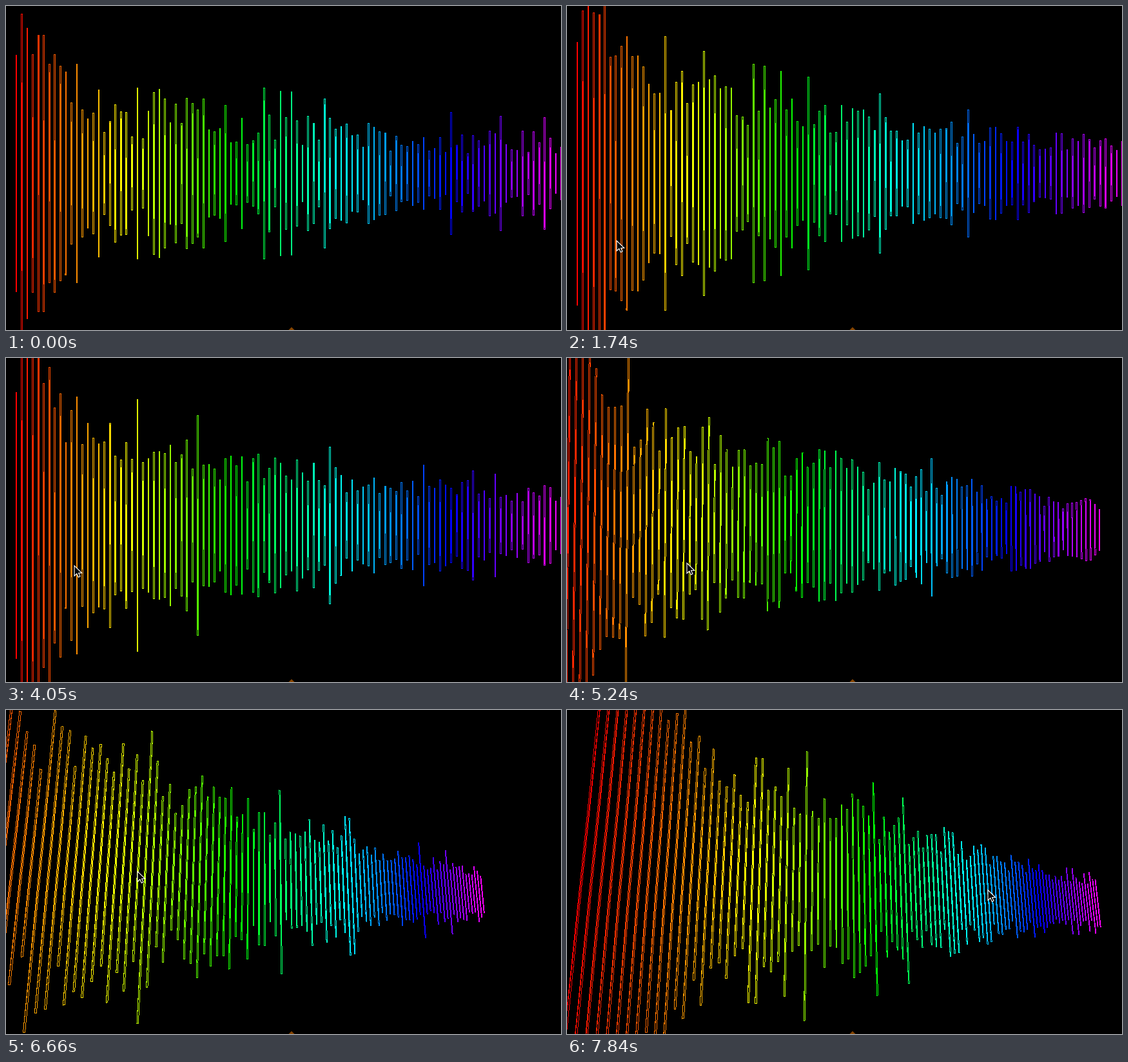
An HTML page for the animation above (8000 ms loop, 861 by 504 pixels).

```html
<!DOCTYPE html>
<html lang="en">
<head>
<meta charset="utf-8">
<title>Spectrum bars</title>
<style>
  html, body { margin: 0; width: 100%; height: 100%; overflow: hidden; background: #000; }
  svg { display: block; width: 100vw; height: 100vh; }
</style>
</head>
<body>
<svg viewBox="0 0 861 504">
  <g id="bars" fill="none" stroke-width="1" shape-rendering="crispEdges"></g>
  <path d="M438.5 504L443 499.500L447.500 504Z" fill="#854400"/>
  <path id="cursor" d="M0 0V16L3.800 12.500L6.300 18L9 16.800L6.600 11.500H11.700Z" fill="#000" stroke="#fff" stroke-width="1.1"/>
</svg>
<script>
const LOOP = 8000, COUNT = 100, BEAT = 195, HALF_WIDTH = 0.1;
const POINTER_IN = 668;

// Pauses as [time, length]; between them the picture is redrawn on an even beat
const pauses = [[0, 80], [1060, 170], [2510, 180], [4050, 210], [5240, 210], [6660, 180], [7840, 160]];

// Camera: time, middle x, spacing, depth per bar, middle y, drop per bar, depth per height, lean
const views = [
  [4260, 443, 8.54, 0, 260.5, 0, 0, 0],
  [5240, 451, 8.43, .00207, 261, .145, .000023, 0],
  [6660, 450, 7.805, .0066, 264, .61, .000286, -.017],
  [7840, 555, 7.2, .0064, 277.6, .605, .00027, -.0407]
];
const pointer = [
  [2860, 77, 365], [4050, 106, 323], [5240, 186, 319], [6660, 204, 251], [7840, 653, 280]
];

const lerp = (a, b, k) => a + (b - a) * k;

const steps = pauses.flatMap(([time, length], n) => {
  const from = time + length, to = (pauses[n + 1] || [LOOP])[0];
  const count = Math.round((to - from) / BEAT);
  return [time, ...Array.from({ length: count }, (_, k) => lerp(from, to, k / count))];
});

// Values of a keyed track at time t, without the time itself
function track(keys, t) {
  let n = 0;
  while (n < keys.length - 2 && t >= keys[n + 1][0]) n++;
  const [a, b] = [keys[n], keys[n + 1]];
  const k = Math.min(1, Math.max(0, (t - a[0]) / (b[0] - a[0])));
  return a.slice(1).map((v, j) => lerp(v, b[j + 1], k));
}

function noise(i, seed) {
  const s = Math.sin(i * 127.1 + seed * 311.7 + 17.3) * 43758.5453;
  return s - Math.floor(s);
}

// The music swells once, around 2.5 s, then stays fuller than at the start
const loudness = t => 0.4 * Math.min(1, t / 2500) + 0.6 * Math.exp(-(((t - 2510) / 700) ** 2));

// Half height: strong bass, then a slope that is flatter and smoother when loud
function level(i, step, loud) {
  const slope = lerp(85, 165, loud) * (1 - i / COUNT) ** lerp(2, 1, loud);
  const bass = 130 * Math.exp(-((i / 7) ** 2));
  if (i === 0) return 0.7 * (48 + slope + bass);
  const r = noise(i, step);
  const peak = r > 0.94 ? 0.4 : 0;
  const rough = lerp(0.45, 0.13, loud) * (i < 9 ? 0.5 : 1);
  return (48 + slope + bass) * (1 + rough * (r * 2 - 1) + peak * (1 - loud));
}

function projector([x, gap, depth, y, drop, tilt, lean]) {
  return (i, v) => {
    const u = i - 50, w = 1 + depth * u + tilt * v;
    return (x + (gap * u + lean * v) / w).toFixed(2) + ' ' + (y + (drop * u - v) / w).toFixed(2);
  };
}

const group = document.getElementById('bars');
const cursor = document.getElementById('cursor');
const bars = Array.from({ length: COUNT }, (_, i) => {
  const bar = document.createElementNS('http://www.w3.org/2000/svg', 'path');
  bar.setAttribute('stroke', `hsl(${i * 3.03} 100% 50%)`);
  return group.appendChild(bar);
});

function draw(step) {
  const t = steps[step], loud = loudness(t);
  const project = projector(track(views, t));
  bars.forEach((bar, i) => {
    const h = level(i, step, loud);
    const l = i - HALF_WIDTH, r = i + HALF_WIDTH;
    const top = project(r, h);
    bar.setAttribute('d', `M${project(l, -h)}L${project(l, h)}L${top}L${project(r, -h)}ZL${top}`);
  });
  const [px, py] = track(pointer, t);
  cursor.setAttribute('transform', `translate(${px.toFixed(1)} ${py.toFixed(1)})`);
  cursor.setAttribute('visibility', t < POINTER_IN ? 'hidden' : 'visible');
}

let shown = -1;
const start = performance.now();
function tick() {
  const t = (performance.now() - start) % LOOP;
  let step = steps.length - 1;
  while (step && steps[step] > t) step--;
  if (step !== shown) draw(shown = step);
  requestAnimationFrame(tick);
}
tick();
</script>
</body>
</html>
```
